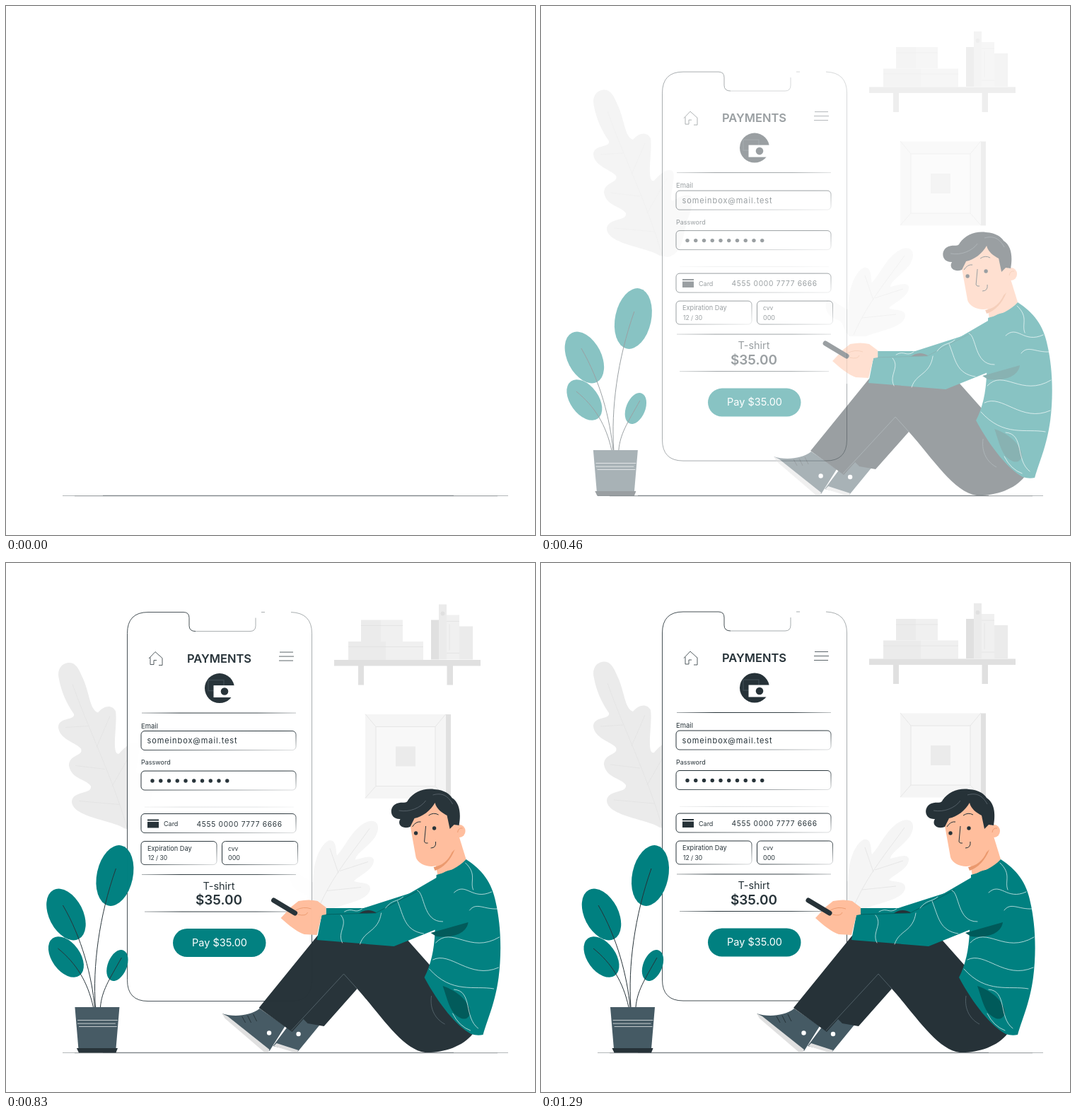
Write an HTML page that moves like this. It is 748 px wide and 748 px high and loops after 1330 ms.

```html
<!DOCTYPE html>
<html lang="en">
<head>
<meta charset="utf-8">
<title>Payments</title>
<style>
  html, body { margin: 0; width: 100%; height: 100%; overflow: hidden; background: #fff; }
  svg { display: block; width: 100vw; height: 100vh; }
  text { font-family: Inter, sans-serif; fill: #263238; }
  .small { font-size: 9px; }
  .line { fill: none; stroke: #263238; stroke-width: 1; }
  .dark { fill: #263238; }
  .slate { fill: #455a64; }
  .teal { fill: #008080; }
  .shade { fill: #005a5a; }
  .skin { fill: #ffbe9d; }
  .wave { fill: none; stroke: #fff; stroke-width: .9; stroke-linecap: round; opacity: .75; }
  .g1 { fill: #e0e0e0; }
  .g2 { fill: #ebebeb; }
  .g3 { fill: #f0f0f0; }
  .vein { fill: none; stroke: #e2e2e2; stroke-width: .8; }
</style>
</head>
<body>
<svg viewBox="0 0 748 748">
  <defs>
    <linearGradient id="boxFade" x2="1" y2="1">
      <stop offset=".45" stop-color="#263238"/>
      <stop offset="1" stop-color="#263238" stop-opacity=".15"/>
    </linearGradient>
    <linearGradient id="ruleFade">
      <stop offset="0" stop-color="#263238" stop-opacity=".4"/>
      <stop offset=".25" stop-color="#263238"/>
      <stop offset=".75" stop-color="#263238" stop-opacity=".9"/>
      <stop offset="1" stop-color="#263238" stop-opacity=".3"/>
    </linearGradient>
  </defs>

  <g id="room">
    <path class="g2" d="M88 139.500C76 141 72 152 75 163C78 180 86 198 96 212C98 222 74 216 74 231C76 248 98 252 106 261C110 272 89 269 89 285C92 304 114 304 120 314C122 326 94 320 93 336C94 358 150 362 168 374L180 376C200 370 200 350 205 330C208 318 216 306 213 292C210 284 196 290 188 296C178 300 190 270 187 256C182 248 168 258 160 268C148 272 158 226 155 208C150 198 138 200 130 210C118 206 118 180 108 160C102 146 98 139 88 139.500Z"/>
    <path class="vein" d="M94 170C115 230 150 300 171 372M116 229L84 231M128 259L147 215M140 290L98 285M150 314L178 265M160 340L103 335"/>
    <path fill="#f5f5f5" d="M512 364C526 360 530 372 522 386C512 400 494 410 494 418C505 416 518 410 520 418C521 432 500 440 492 448C496 452 516 448 515 460C512 476 480 480 460 488H436C425 476 430 470 420 465C405 460 400 450 404 436C410 432 425 448 434 450C434 430 440 400 456 391C468 388 466 405 468 412C480 400 490 372 512 364Z"/>
    <path class="vein" d="M514 374C490 408 462 440 442 486M470 437L458 402M472 434L512 421M454 462L502 457"/>
    <rect class="g2" x="502" y="79" width="28" height="30.500"/>
    <rect class="g3" x="530" y="79" width="31" height="30.500"/>
    <rect class="g2" x="484" y="109.500" width="53" height="26"/>
    <rect class="g3" x="537" y="109.500" width="53" height="26"/>
    <path class="vein" d="M502 87H561M484 117H590"/>
    <rect class="g1" x="601" y="79" width="11" height="56"/>
    <rect class="g2" x="612" y="57" width="11" height="78"/>
    <rect class="g3" x="623" y="72" width="18" height="63"/>
    <rect class="g2" x="641" y="88" width="19" height="47"/>
    <path class="vein" d="M623 81H641M623 126H641M627 85V122"/>
    <circle class="g1" cx="617.500" cy="70" r="3"/>
    <path class="g1" d="M464 135.500H671V144H632V171H623.500V144H506V171H498V144H464Z"/>
    <rect x="508" y="212.500" width="114" height="119" fill="#f5f5f5"/>
    <rect class="g1" x="622" y="212.500" width="7" height="119"/>
    <rect x="523" y="230" width="84" height="84" fill="#f8f8f8" stroke="#e6e6e6"/>
    <path class="vein" d="M508 212L523 230M622 212L607 230M508 331L523 314M622 331L607 314"/>
    <rect class="g2" x="551" y="258" width="28" height="28"/>
  </g>

  <g stroke="#263238" fill="none">
    <path d="M80 692.500H710" stroke-width=".7" opacity=".5"/>
    <path d="M97 693H695" stroke-width=".6" opacity=".4"/>
    <path d="M137 692.200H633" stroke-width=".8" opacity=".5"/>
  </g>

  <g id="device">
    <path fill="#fff" d="M201 69H251Q259 69 259 77V88Q259 96 267 96H345Q353 96 353 88V77Q353 69 361 69H403Q432.500 69 432.500 99V589Q432.500 619 403 619H201Q171.500 619 171.500 589V99Q171.500 69 201 69Z"/>
    <path class="line" d="M268 96Q259 96 259 88V77Q259 69 251 69H201Q171.500 69 171.500 99V589Q171.500 619 201 619H403Q432.500 619 432.500 589V510" opacity=".85"/>
    <path class="line" d="M268 96H345Q353 96 353 88V77M361 69H366M403 69Q432.500 70 432.500 99V510" opacity=".4"/>
    <path class="line" d="M202 134.500L211 125L221 134V144H216M204 133V143H209V137H213" stroke-width=".8" opacity=".8"/>
    <path class="line" d="M387 125.500H406M386 131.500H407M386 137.500H406" stroke-width=".9" opacity=".75"/>
    <text x="301.500" y="140" font-size="16.500" font-weight="600" text-anchor="middle">PAYMENTS</text>
    <circle class="dark" cx="302" cy="176.500" r="21"/>
    <rect x="286" y="165" width="22" height="15" fill="none" stroke="#3a474e" stroke-width="1.500"/>
    <rect x="293.500" y="172.500" width="30" height="17" fill="#fff"/>
    <circle class="dark" cx="309" cy="181" r="5.300"/>
    <g id="rules" fill="url(#ruleFade)"></g>
    <g id="boxes" fill="none" stroke="url(#boxFade)"></g>
    <text x="191" y="233" font-size="9.500">Email</text>
    <text x="199.500" y="254.500" font-size="11" letter-spacing=".9">someinbox@mail.test</text>
    <text class="small" x="191" y="284.500">Password</text>
    <g id="dots" class="dark"></g>
    <path class="dark" d="M200 362H216V364H200ZM200 365.500H216V374H200Z"/>
    <text class="small" x="223" y="371.500">Card</text>
    <text x="269.500" y="372" font-size="10.200" letter-spacing=".7">4555 0000 7777 6666</text>
    <text x="200" y="406" font-size="9.200">Expiration Day</text>
    <text x="201" y="419.500" font-size="8.500">12 / 30</text>
    <text x="314" y="406" font-size="8.500">cvv</text>
    <text class="small" x="314" y="419.500">000</text>
    <text x="301" y="461" font-size="14.500" text-anchor="middle">T-shirt</text>
    <text x="301" y="482.500" font-size="19" font-weight="600" text-anchor="middle">$35.00</text>
    <rect class="teal" x="236" y="516.500" width="131.500" height="40" rx="20"/>
    <text x="302" y="541" font-size="14.500" text-anchor="middle" style="fill:#fff">Pay $35.00</text>
  </g>

  <g id="plant">
    <ellipse class="teal" rx="25.500" ry="43.500" transform="translate(154.500 442) rotate(12)"/>
    <ellipse class="teal" rx="24" ry="39" transform="translate(85.500 497) rotate(-27)"/>
    <ellipse class="teal" rx="20" ry="32.500" transform="translate(85.500 557) rotate(-36)"/>
    <ellipse class="teal" rx="13.500" ry="23" transform="translate(158 569) rotate(22)"/>
    <path class="line" d="M127 628C123 570 132 500 156 432M126 628C122 585 108 530 81 484M124 628C116 592 100 566 74 545M134 628C136 605 146 590 164 558" stroke-width=".9"/>
    <path class="slate" d="M98 628H161L156 687H103Z"/>
    <path class="dark" d="M100.500 686H158.500L156 692.500H103.500Z"/>
    <path class="wave" d="M102 646.500H158M102 651.200H155M104 655.500H157"/>
  </g>

  <g id="person">
    <path class="slate" d="M377 683L398 655L428 640L444 652L412 691Z"/>
    <path class="g1" d="M382 679L413 689L411 692H407L378 683Z"/>
    <path class="slate" d="M305 637C320 642 344 641 358 630L394 655L372 690Z"/>
    <path class="g1" d="M305 637L313 641L372 688L370 692H365L309 644Z"/>
    <path class="line" d="M333 641L338 650M341 640L346 650M349 638L354 648" stroke-width="1.300"/>
    <circle cx="371.500" cy="664.500" r="3.200" fill="#fff"/>
    <circle cx="413" cy="666" r="3.200" fill="#fff"/>
    <path class="dark" d="M357 629L439 528L452 515L560 525L600 570L660 665C645 685 615 693 592 692C560 688 530 640 496 602L449 655L426 651L420 645L404 663Z"/>
    <path d="M403 661L477 581L496 602M601 612C598 632 608 646 620 652" fill="none" stroke="#5b6b73" stroke-width=".8"/>

    <path class="teal" d="M452 488H505L608 455V475L520 498H452Z"/>
    <path class="dark" d="M497 497Q510 486 524 495Z"/>
    <path class="skin" d="M604 412L610 442Q635 438 650 419L638 380Z"/>
    <path class="teal" d="M608 441C625 437 640 430 650 419C672 433 687 452 692 480C700 515 700 555 696 586C691 622 682 640 674 667Q666 669 657 666C636 654 612 625 591 586C600 568 605 548 606 520Z"/>
    <path class="shade" d="M617 598C640 606 656 622 656 637C651 650 640 644 632 636C625 626 622 612 617 598ZM600 523L653 508C651 522 635 531 608 528Z"/>
    <path class="teal" d="M446 497L522 495L608 445C626 428 650 430 658 449C672 478 669 492 645 503L548 542L439 533Z"/>
    <path d="M446 497L522 495L585 462" fill="none" stroke="#005a5a" stroke-width=".8"/>
    <path class="wave" d="M473 498C484 511 467 522 475 537M500 539C506 519 526 522 530 495M553 478C562 500 563 520 590 524M581 463C592 466 588 508 617 507M478 493C490 486 492 497 503 489M536 488C546 475 552 480 561 472M649 424C666 440 655 450 660 462M633 466C650 450 658 478 686 465M655 491C664 479 675 490 694 489M607 537C630 512 655 554 697 529M603 561C628 548 655 590 696 572M598 574C630 610 662 597 689 602M633 603C660 605 646 642 667 658M631 637Q640 655 656 661"/>

    <path class="skin" d="M388 502L403 486L413 478Q428 475 440 478L452 487V497L446 498L439 526L421 525C408 520 398 511 388 502Z"/>
    <path d="M409 491Q420 485 431 489M412 497Q424 500 426 494" fill="none" stroke="#eb996e" stroke-width=".9"/>
    <path d="M378 477L408 495" stroke="#263238" stroke-width="7" stroke-linecap="round"/>

    <path fill="#eb996e" d="M604 430Q622 427 630 409L634 405Q625 428 606 435Z"/>
    <path class="skin" d="M570 366L579 416C582 427 602 433 612 426C622 420 630 410 637 394L637 350L600 335Z"/>
    <ellipse class="skin" cx="641" cy="379" rx="8" ry="9"/>
    <path d="M638 381Q639 374 645 375" fill="none" stroke="#eb996e" stroke-width=".9"/>
    <path class="dark" d="M571 373C560 377 552 370 557 362C542 363 540 345 552 340C560 337 566 341 568 335C576 324 590 318 605 320C620 321 627 327 630 332C641 339 643 354 640 371L633 370L627 376L623 357C616 353 608 348 606 339C600 350 588 359 577 361Z"/>
    <path d="M555 350C570 353 586 346 593 336M603 328C617 324 625 330 631 341" fill="none" stroke="#66727a" stroke-width=".7"/>
    <circle class="dark" cx="579" cy="382" r="2.700"/>
    <circle class="dark" cx="605" cy="375" r="2.700"/>
    <path class="line" d="M574 373Q579 365 586 366M597 357Q604 352 611 356" stroke-width="2"/>
    <path class="line" d="M593 372L591 394Q592 397 596 396M600 403Q608 403 607 394" stroke-width="1.200"/>
  </g>
</svg>
<script>
  const $ = id => document.getElementById(id);
  const fill = (id, items, draw) => $(id).innerHTML = items.map(draw).join('');

  fill('rules', [[192, 211, 218], [192, 439.5, 218], [196, 492, 211]],
    ([x, y, w]) => `<rect x="${x}" y="${y}" width="${w}" height="1"/>`);
  $('rules').innerHTML += '<rect x="196" y="344" width="211" height="1" opacity=".15"/>';
  fill('boxes', [[191, 237, 219, 27], [191, 293.5, 219, 27], [191, 354, 219, 27], [191, 393, 107, 33], [305.5, 393, 107, 33]],
    ([x, y, w, h]) => `<rect x="${x}" y="${y}" width="${w}" height="${h}" rx="5"/>`);
  fill('dots', [...Array(10).keys()],
    i => `<circle cx="${207 + i * 11.75}" cy="307.5" r="2.7"/>`);

  const LOOP = 1330, FPS = 24, SLIDE = 45;

  const cubic = (s, a, b) => 3 * s * (1 - s) ** 2 * a + 3 * s * s * (1 - s) * b + s ** 3;

  // cubic-bezier(.36, -.01, .5, 1.38), solved by bisection
  function ease(x) {
    if (x >= 1) return 1;
    let lo = 0, hi = 1;
    for (let i = 0; i < 24; i++) {
      const mid = (lo + hi) / 2;
      if (cubic(mid, .36, .5) < x) lo = mid; else hi = mid;
    }
    return cubic(lo, -.01, 1.38);
  }

  const layers = [
    { id: 'room', dx: 0, dy: -1, duration: 1150 },
    { id: 'device', dx: 0, dy: 1, duration: 1250 },
    { id: 'plant', dx: -1, dy: 0, duration: 1250 },
    { id: 'person', dx: 1, dy: 0, duration: 1250 }
  ];

  function render(now) {
    const step = Math.floor((now % LOOP + 4) * FPS / 1000);
    for (const { id, dx, dy, duration } of layers) {
      const p = ease(step * 1000 / FPS / duration);
      const away = SLIDE * (1 - p);
      const el = $(id);
      el.setAttribute('transform', `translate(${dx * away} ${dy * away})`);
      el.setAttribute('opacity', step < 3 ? 0 : Math.min(1, Math.max(0, p)));
    }
  }

  const start = performance.now();
  function tick() {
    render(performance.now() - start);
    requestAnimationFrame(tick);
  }
  tick();
</script>
</body>
</html>
```
